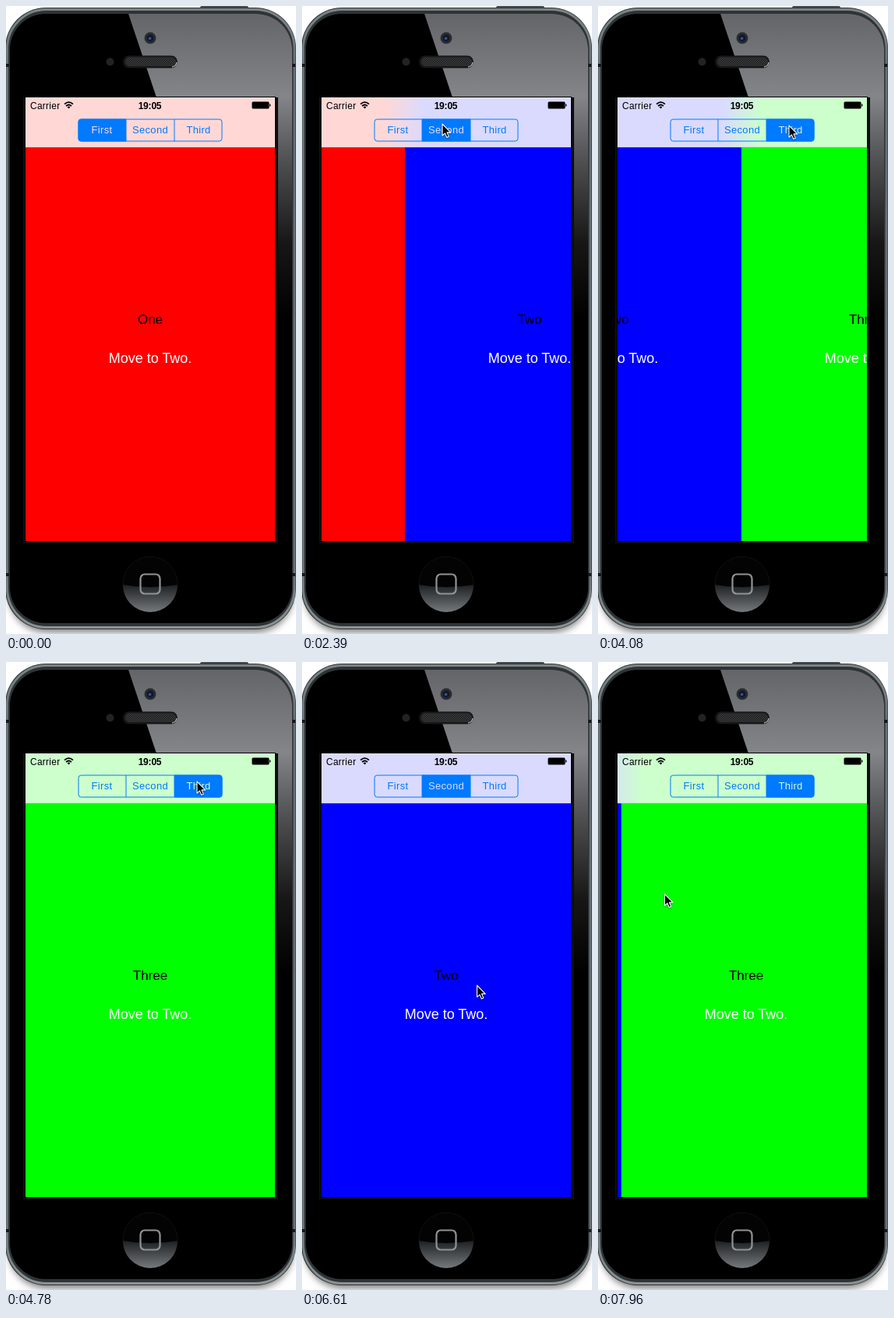
Write an HTML page that moves like this. It is 372 by 804 pixels and loops after 8000 ms.

```html
<!DOCTYPE html>
<html lang="en">
<head>
<meta charset="utf-8">
<title>Segmented pages</title>
<style>
html, body { margin: 0; width: 100%; height: 100%; overflow: hidden; background: #fff; }
svg { display: block; width: 372px; height: 804px; }
text { font-family: "Liberation Sans", Arial, sans-serif; text-anchor: middle; }
.title { font-size: 17px; }
.move { font-size: 18px; fill: #fff; }
.seg { font-size: 13px; letter-spacing: .3px; }
</style>
</head>
<body>
<svg viewBox="0 0 372 804">
  <defs>
    <linearGradient id="metal" x2="0" y2="1">
      <stop stop-color="#7b8386"/><stop offset=".1" stop-color="#667176"/>
      <stop offset=".9" stop-color="#667176"/><stop offset="1" stop-color="#8b9194"/>
    </linearGradient>
    <linearGradient id="gloss" gradientUnits="userSpaceOnUse" x1="0" y1="10" x2="0" y2="400">
      <stop stop-color="#646568"/><stop offset=".27" stop-color="#848589"/>
      <stop offset=".5" stop-color="#4b4c4e"/><stop offset=".75" stop-color="#171718"/><stop offset="1"/>
    </linearGradient>
    <linearGradient id="bowl" x2="0" y2="1">
      <stop stop-color="#1e2022"/><stop offset="1" stop-color="#75797c"/>
    </linearGradient>
    <linearGradient id="tint" gradientUnits="userSpaceOnUse" x1="25" y1="0" x2="985" y2="0">
      <stop offset=".306" stop-color="#ffd8d6"/><stop offset=".360" stop-color="#dadaff"/>
      <stop offset=".640" stop-color="#dadaff"/><stop offset=".694" stop-color="#ccffcc"/>
    </linearGradient>
    <pattern id="mesh" width="3" height="3" patternUnits="userSpaceOnUse">
      <rect width="3" height="3" fill="#151516"/>
      <path d="M0 0h1.5v1.5h-1.5zM1.5 1.5h1.5v1.5h-1.5z" fill="#434446"/>
    </pattern>
    <filter id="soft" x="-10%" y="-10%" width="120%" height="120%"><feGaussianBlur stdDeviation="5"/></filter>
    <clipPath id="face"><rect x="5" y="10" width="362" height="780" rx="46"/></clipPath>
    <clipPath id="screen"><rect x="25" y="117" width="320" height="568"/></clipPath>
    <clipPath id="pill"><rect x="92.5" y="144.5" width="185" height="29" rx="4"/></clipPath>
  </defs>

  <!-- phone body -->
  <rect x="4" y="400" width="364" height="402" rx="48" fill="#808080" filter="url(#soft)"/>
  <rect x="249" y="0" width="62" height="6" rx="2" fill="#484d50"/>
  <rect x="-1" y="2" width="373" height="796" rx="52" fill="#2e3335"/>
  <rect x="1.500" y="4.500" width="368.500" height="791" rx="50" fill="none" stroke="url(#metal)" stroke-width="3"/>
  <path d="M0 76h4M0 728h4M367 76h4M367 728h4" stroke="#15181a" stroke-width="4"/>
  <rect x="5" y="10" width="362" height="780" rx="46"/>
  <path d="M157 10L193 117H345V400H367V10z" fill="url(#gloss)" clip-path="url(#face)"/>
  <path d="M22 117H349V688H22z" fill="#0e0e0e"/>
  <rect x="24" y="116" width="322" height="570"/>

  <circle cx="133.500" cy="71.500" r="5" fill="#232324"/>
  <circle cx="185" cy="41" r="7.500" fill="#2b2d31"/>
  <circle cx="185" cy="41" r="4.500" fill="#10182a"/>
  <circle cx="184.500" cy="41.500" r="2" fill="#2d4f86"/>
  <rect x="150" y="63.500" width="70" height="16" rx="8" fill="#171718"/>
  <rect x="153" y="65.500" width="65" height="11.500" rx="5.700" fill="url(#mesh)"/>
  <path d="M213 78Q218.500 77 219 72" fill="none" stroke="#a5a6a8" stroke-width="1.500"/>

  <circle cx="185" cy="740" r="35" fill="#030303" stroke="#101011"/>
  <path d="M150 741Q185 747 220 741A35 35 0 0 1 150 741z" fill="url(#bowl)"/>
  <rect x="172.500" y="727.500" width="25" height="25" rx="5.500" fill="none" stroke="#929394" stroke-width="2.200"/>

  <!-- screen -->
  <g clip-path="url(#screen)">
    <g id="pages"></g>
    <rect id="bar" x="25" y="117" width="960" height="64"/>
    <rect x="25" y="180.500" width="320" height=".5" opacity=".2"/>
  </g>
  <text x="31" y="131.500" font-size="12" style="text-anchor:start;letter-spacing:.25px">Carrier</text>
  <path d="M75 125.700Q80.500 120.700 86 125.700M77 128Q80.500 125 84 128" fill="none" stroke="#000" stroke-width="1.700"/>
  <path d="M78.500 129.300Q80.500 127.800 82.500 129.300L80.500 131.500z"/>
  <text x="184.500" y="131.500" font-size="12" font-weight="bold" style="letter-spacing:-.2px">19:05</text>
  <rect x="315.500" y="122.500" width="22" height="9" rx="1.500"/>
  <path d="M338.500 125.500q1.500 1.500 0 3z" stroke="#000" stroke-width=".7"/>

  <g id="fills" clip-path="url(#pill)" fill="#007aff"></g>
  <g fill="none" stroke="#007aff">
    <rect x="93" y="145" width="184" height="28" rx="3.500"/>
    <path d="M154 145v28M216 145v28"/>
  </g>
  <g id="labels"></g>

  <path id="cursor" d="M0 0V15L3.500 11.900L5.800 17.200L8.300 16.100L6 10.900H10.700z"
        stroke="#fff" stroke-width="1.100" stroke-linejoin="round" style="filter:drop-shadow(0 1px 1px #0006)"/>
</svg>

<script>
const LOOP = 8000;
const $ = id => document.getElementById(id);
const clamp = v => Math.max(0, Math.min(1, v));
const mix = (a, b, u) => a + (b - a) * u;
const mixColor = (a, b, u) => a.map((v, i) => mix(v, b[i], u));
const rgb = c => `rgb(${c.map(Math.round)})`;
const easeIn = u => u * u;
const easeOut = u => 1 - (1 - u) ** 2;
const easeBoth = u => u < .5 ? 2 * u * u : 1 - 2 * (1 - u) ** 2;

const BLUE = [0, 122, 255];
const TINTS = [[255, 216, 214], [218, 218, 255], [204, 255, 204]];

$('pages').innerHTML = [['One', '#f00'], ['Two', '#00f'], ['Three', '#0f0']].map(([name, color], i) =>
  `<g transform="translate(${25 + i * 320} 117)">
    <rect width="320" height="568" fill="${color}"/>
    <text class="title" x="160" y="290">${name}</text>
    <text class="move" x="160" y="340">Move to Two.</text>
  </g>`).join('');

const segs = [['First', 92, 62], ['Second', 154, 62], ['Third', 216, 62]];
$('fills').innerHTML = segs.map(([, x, w]) => `<rect x="${x}" y="144" width="${w}" height="30"/>`).join('');
$('labels').innerHTML = segs.map(([name, x, w]) => `<text class="seg" x="${x + w / 2}" y="163">${name}</text>`).join('');
const fills = [...$('fills').children], labels = [...$('labels').children];

// visible from, motion start, duration, from page, to page
const slides = [
  [2050, 2060, 560, 0, 1],
  [3850, 3800, 560, 1, 2],
  [6040, 5948, 560, 2, 1],
  [7500, 7470, 540, 1, 2]
];
// visible from, fade start, fade length, old segment, new segment
const picks = [
  [2050, 2050, 150, 0, 1],
  [3850, 3820, 150, 1, 2],
  [6040, 6040, 0, 2, 1],
  [7600, 7600, 0, 1, 2]
];
// time, x, y, easing toward this point
const path = [
  [690, 3, 186],
  [1450, 180, 151, easeOut],
  [2930, 180, 151, easeBoth],
  [3250, 245, 153, easeBoth],
  [4780, 245, 153, easeBoth],
  [5440, 217, 445, easeBoth],
  [6500, 217, 445, easeBoth],
  [6610, 224.5, 414, easeIn],
  [6840, 276, 313, easeBoth],
  [6900, 276, 313, easeBoth],
  [7080, 284, 296, easeBoth]
];

const current = (list, t) => list.filter(e => t >= e[0]).pop();

function pageAt(t) {
  const s = current(slides, t);
  if (!s) return 0;
  const page = mix(s[3], s[4], easeBoth(clamp((t - s[1]) / s[2])));
  return Math.round(page * 320) / 320; // whole pixels
}

function segmentsAt(t) {
  const p = current(picks, t);
  if (!p) return [1, 0, 0];
  const u = p[2] ? clamp((t - p[1]) / p[2]) : 1;
  const alpha = [0, 0, 0];
  alpha[p[3]] = 1 - u * u;
  alpha[p[4]] = mix(.15, 1, u);
  return alpha;
}

function cursorAt(t, page) {
  if (t >= 7500) { // dragging the page
    const x = Math.max(85.5, 284 - 320 * (page - 1));
    return [x, mix(297, 296, (x - 86) / 198)];
  }
  const i = path.findIndex(k => t < k[0]);
  if (i < 0) return path[path.length - 1].slice(1, 3);
  const a = path[i - 1], b = path[i];
  const u = b[3]((t - a[0]) / (b[0] - a[0]));
  return [mix(a[1], b[1], u), mix(a[2], b[2], u)];
}

function draw(t) {
  const page = pageAt(t);
  const shift = `translate(${-320 * page} 0)`;
  $('pages').setAttribute('transform', shift);
  $('bar').setAttribute('transform', shift);

  const left = Math.min(1, Math.floor(page));
  const tint = mixColor(TINTS[left], TINTS[left + 1], page - left);
  // the bar blurs only what is on screen, so it is flat at rest
  $('bar').setAttribute('fill', page % 1 ? 'url(#tint)' : rgb(tint));
  segmentsAt(t).forEach((alpha, i) => {
    fills[i].setAttribute('opacity', alpha);
    labels[i].setAttribute('fill', rgb(mixColor(BLUE, tint, Math.sqrt(alpha))));
  });

  const shown = t >= 690;
  $('cursor').setAttribute('visibility', shown ? 'visible' : 'hidden');
  if (shown) $('cursor').setAttribute('transform', `translate(${cursorAt(t, page)})`);
}

const start = performance.now();
function tick(now) {
  draw(Math.max(0, now - start) % LOOP);
  requestAnimationFrame(tick);
}
draw(0);
requestAnimationFrame(tick);
</script>
</body>
</html>
```
